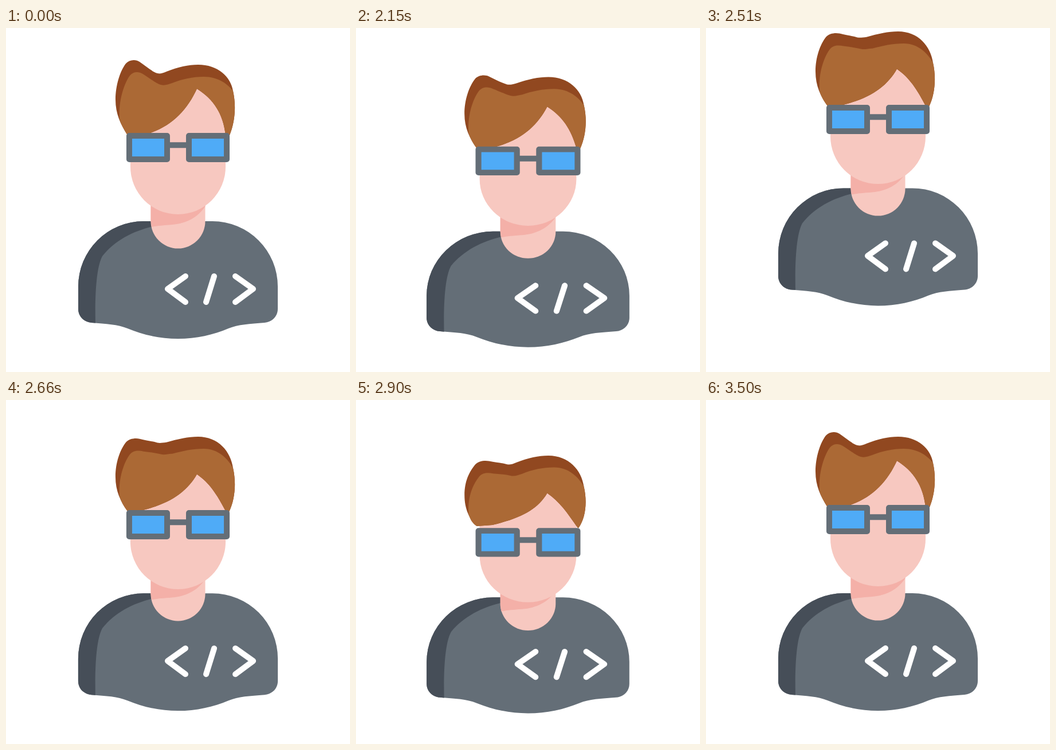
Recreate the animation shown at these times as an HTML page. Size 600 px wide and 600 px high, loop 3.53 s.

```html
<!DOCTYPE html>
<html lang="en">
<head>
<meta charset="utf-8">
<title>Developer jump</title>
<style>
  html, body { margin: 0; height: 100%; overflow: hidden; background: #fff; }
  svg { display: block; width: 100vw; height: 100vh; }
</style>
</head>
<body>
<svg viewBox="0 0 600 600">
  <g id="figure">
    <path fill="#646e77" d="M126 451A114 114 0 0 1 240 337H360A114 114 0 0 1 474 451V490C474 503 464 513 451 514C425 516 405 517 388 524C362 535 332 542 300 542C268 542 238 535 212 524C195 517 175 516 149 514C136 513 126 503 126 490Z"/>
    <path fill="#464e58" d="M126 451A114 114 0 0 1 240 337H262V345C225 352 190 370 168 398C157 418 155 470 156 514.6L149 514C136 513 126 503 126 490Z"/>
    <path fill="none" stroke="#fff" stroke-width="10" stroke-linecap="round" stroke-linejoin="round" d="M313 433L282 455L313 478M363 433L349 478M400 433L431 455L400 478"/>
    <g id="neck">
      <path fill="#f7c8c0" d="M252.5 280H347.5V337A47.5 47.5 0 0 1 252.5 337Z"/>
      <path id="shadow" fill="#f4b0a8" d="M252.5 280H347.5V311C335 330 315 341 290 343C275 344 264 345 254 347L252.5 337Z"/>
    </g>
    <path id="face" fill="#f7c8c0" d="M217 170V242A83 83 0 0 0 383 242V170Z"/>
    <g id="head">
      <path fill="#f7c8c0" d="M217 200V165L300 100H375L385 200Z"/>
      <path id="hairBack" fill="#914820"/>
      <path id="hairFront" fill="#ab6935"/>
      <g fill="#4fabf7" stroke="#646e77" stroke-width="10" stroke-linejoin="round">
        <path d="M281 204.3H319"/>
        <rect x="215" y="188" width="66" height="41"/>
        <rect x="319" y="188" width="66" height="41"/>
      </g>
    </g>
  </g>
</svg>
<script>
const LOOP = 3530, REST = 2030, STEP = 30;
const el = id => document.getElementById(id);
const shift = (id, y) => el(id).setAttribute('transform', `translate(0 ${y})`);
const draw = (id, d) => el(id).setAttribute('d', d);

// Sine-eased interpolation through [time, value] keys
function track(t, keys) {
  if (t <= keys[0][0]) return keys[0][1];
  for (let i = 1; i < keys.length; i++) {
    const [a, from] = keys[i - 1], [b, to] = keys[i];
    if (t < b) return from + (to - from) * (1 - Math.cos(Math.PI * (t - a) / (b - a))) / 2;
  }
  return keys[keys.length - 1][1];
}

// Follow-through: held in the air, strongest on landing, then rebound
const follow = (t, air, land, rebound) => track(t,
  [[2020, 0], [2300, air], [2650, air], [2860, land], [3070, rebound], [3350, 0]]);

function drawHair(tuft, dip, crown, tip, lift) {
  const mid = (tuft + dip) / 2, slope = (dip + crown) / 2, bend = .8 * tuft + .2 * dip;
  const left = `212 ${187 - lift}`, right = 187 - .6 * lift;
  const side = `C402 137 399 165 ${390 - .4 * lift} ${right}L${383 + .3 * lift} ${right}
    C${379 - .75 * tip} ${150 + .4 * tip} ${362 - .5 * tip} ${124 + .8 * tip} 333 ${106 + tip}
    C316 ${143 + .5 * tip} 288 ${173 - lift} ${245 - .4 * tip} ${185 - lift}L${left}Z`;
  draw('hairBack', `M${left}C200 168 191 150 191 125C191 100 199 ${75 + tuft} 209 ${62 + tuft}
    C215 ${55 + tuft} 226 ${54 + tuft} 233 ${59 + bend}
    C245 ${67 + mid} 254 ${76 + dip} 264 ${79 + dip}C269 ${80 + dip} 273 ${79 + dip} 280 ${76 + slope}
    C300 ${68 + crown} 318 ${64 + crown} 335 ${64 + crown}C370 ${64 + crown} 392 ${85 + crown / 2} 396 110${side}`);
  draw('hairFront', `M${left}C205 176 200 167 198 158C196 125 207 ${95 + tuft} 216 ${83 + tuft}
    C223 ${75 + tuft} 232 ${76 + tuft} 240 ${81 + bend}
    C250 ${87 + mid} 262 ${97 + dip} 270 ${99 + dip}C277 ${101 + dip} 283 ${98 + dip} 290 ${96 + slope}
    C308 ${89 + crown} 325 ${85 + crown} 345 ${85 + crown}C370 ${85 + crown} 387 ${98 + crown / 2} 396 110${side}`);
}

function render(now) {
  const ms = now % LOOP;
  const t = ms < REST ? 0 : REST + Math.floor((ms - REST) / STEP) * STEP;
  const y = track(t, [[1965, 0], [2134, 16.5], [2529, -58], [2720, 17], [3070, -4.3], [3270, 3], [3450, 0]]);
  const squash = track(t, [[1965, 0], [2134, .017], [2300, 0], [2650, 0], [2760, .029], [3060, 0]]);
  el('figure').setAttribute('transform',
    `translate(300 ${440 + y}) scale(${1 + squash} ${1 - .9 * squash}) translate(-300 -440)`);
  shift('neck', follow(t, .7, 12, 0));
  shift('shadow', follow(t, .5, 4, 0));
  shift('face', follow(t, 4.7, 22.5, 0));
  shift('head', follow(t, 8.5, 34, .5));
  drawHair(follow(t, 3, 10.5, -5.5), follow(t, -13.5, -9, -4.5),
    follow(t, -9, -9.6, -4.5), follow(t, 14.5, 17, -.5), follow(t, 2, 8, 0));
}

const start = performance.now();
function tick() {
  render(performance.now() - start);
  requestAnimationFrame(tick);
}
tick();
</script>
</body>
</html>
```
